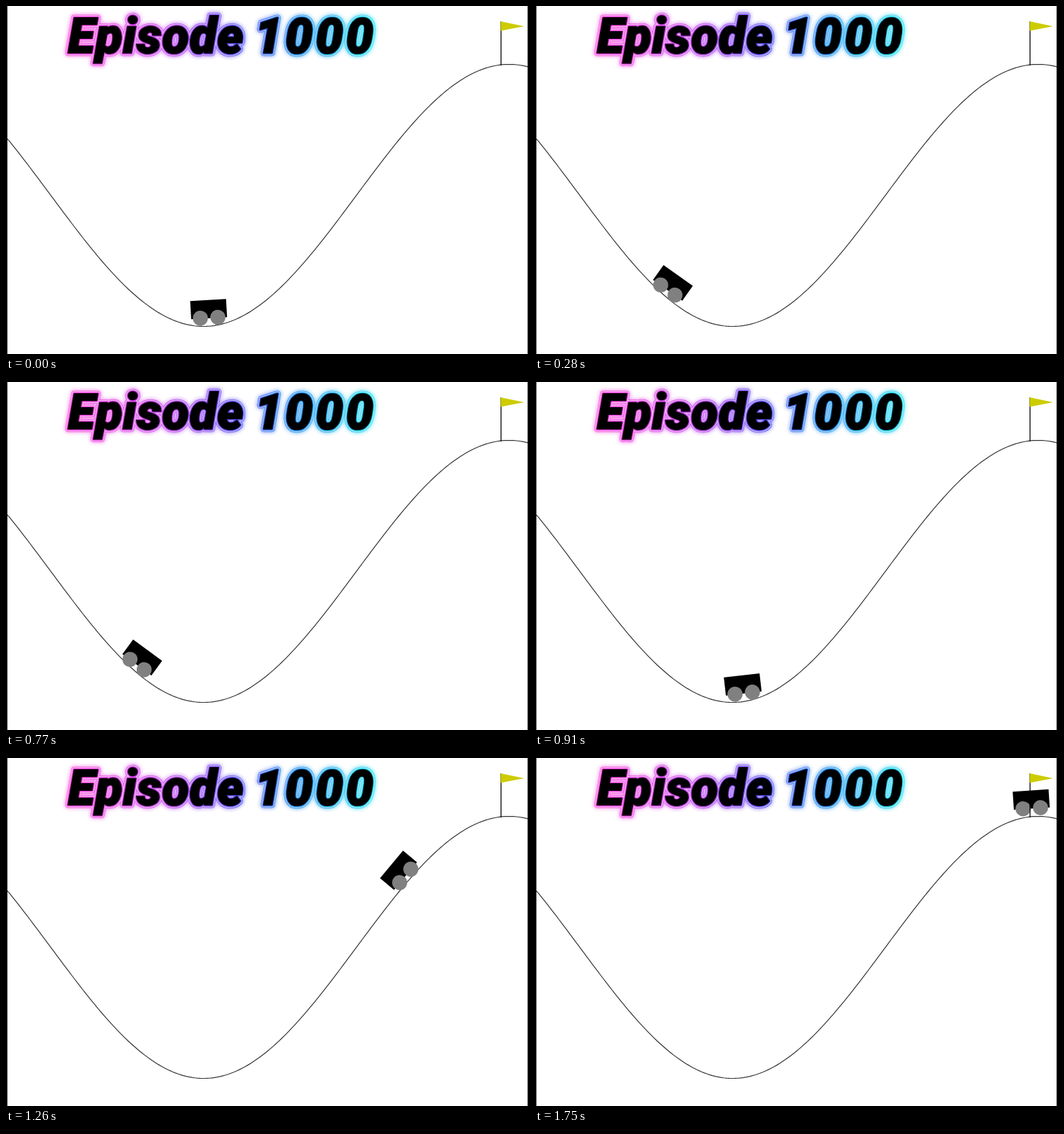
These frames come from a looping animation (748 px wide and 498 px high, 1820 ms). An HTML page:

```html
<!DOCTYPE html>
<html lang="en">
<head>
<meta charset="utf-8">
<title>Mountain car</title>
<style>
  html, body { margin: 0; width: 100%; height: 100%; overflow: hidden; background: #fff; }
  svg { display: block; width: 100%; height: 100%; }
  text { font: italic 900 70px Roboto, sans-serif; }
</style>
</head>
<body>
<svg viewBox="0 0 748 498">
  <defs>
    <linearGradient id="neon" gradientUnits="userSpaceOnUse" x1="88" x2="526" y1="0" y2="0">
      <stop offset="0" stop-color="#ff48dc"/>
      <stop offset=".33" stop-color="#c044f0"/>
      <stop offset=".55" stop-color="#5a50f4"/>
      <stop offset=".75" stop-color="#2090f0"/>
      <stop offset="1" stop-color="#20e0f0"/>
    </linearGradient>
    <filter id="blur" filterUnits="userSpaceOnUse" x="60" y="0" width="500" height="110">
      <feGaussianBlur stdDeviation="2.5"/>
    </filter>
    <g id="title">
      <text x="89" y="66.5" letter-spacing="1.2">Episode</text>
      <text x="356" y="66.5" letter-spacing="4">1000</text>
    </g>
  </defs>

  <g fill="none" stroke="url(#neon)" stroke-linejoin="round">
    <use href="#title" stroke-width="12" opacity=".45" filter="url(#blur)"/>
    <use href="#title" stroke-width="9"/>
    <use href="#title" stroke="#fff" stroke-width="7.5" opacity=".65"/>
    <use href="#title" stroke-width="5"/>
  </g>
  <use href="#title" stroke="#000" stroke-width="2"/>

  <path id="hill" fill="none" stroke="#333" stroke-width="1.2"/>
  <g id="car">
    <path d="M-25.7 .5V-25.5H25.7V.5Z"/>
    <g fill="#808080">
      <circle cx="-12.5" r="10.8"/>
      <circle cx="12.5" r="10.8"/>
    </g>
  </g>
  <path d="M708 22V85" stroke="#000" stroke-width="1.3"/>
  <path d="M707.5 22V35.5L741 29Z" fill="#cccc00"/>
  <path d="M0 0H2V498H0ZM746 0H748V498H746Z"/>
</svg>
<script>
  const FRAME_MS = 70;
  const CLEARANCE = 12;

  // Car centre at each tick: back up the left slope, then over to the flag.
  const carX = [
    290.5, 271, 245, 217.5, 190, 167, 149.7, 137.7, 133,
    136, 151, 187.5, 237.5, 298.5, 365, 430.5, 488,
    534, 571, 600, 623, 642, 658.3, 673.6, 690.5, 710.5
  ];

  const phase = x => 3 * (x - 282.6) / 417.3;
  const hillY = x => 271 + 187.5 * Math.cos(phase(x));

  const points = Array.from({ length: 187 }, (_, i) => {
    const x = 2 + i * 4;
    return `${x} ${hillY(x).toFixed(2)}`;
  });
  document.getElementById('hill').setAttribute('d', 'M' + points.join('L'));

  const car = document.getElementById('car');

  function draw(now) {
    const x = carX[Math.floor(now / FRAME_MS) % carX.length];
    const tilt = -Math.sin(phase(x)) * 180 / Math.PI;
    car.setAttribute('transform', `translate(${x} ${hillY(x) - CLEARANCE}) rotate(${tilt})`);
  }

  let start;
  function tick(now) {
    start ??= now;
    draw(now - start);
    requestAnimationFrame(tick);
  }
  draw(0);
  requestAnimationFrame(tick);
</script>
</body>
</html>
```
